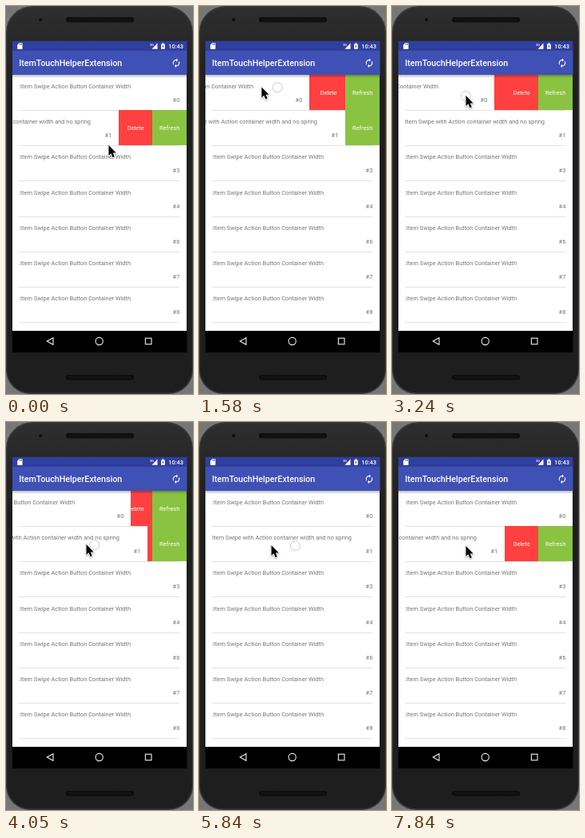
An HTML page with a canvas for the animation above (8000 ms loop, 234x485 px).

```html
<!DOCTYPE html>
<html lang="en">
<head>
<meta charset="utf-8">
<title>Swipe list</title>
<style>
html, body { margin: 0; width: 100%; height: 100%; overflow: hidden; background: #777; }
canvas { display: block; width: 234px; height: 485px; }
</style>
</head>
<body>
<canvas id="stage"></canvas>
<script>
const W = 234, H = 485, LOOP = 8000;
const LEFT = 8, RIGHT = 226, TOP = 43.5, BOTTOM = 433;
const LIST_TOP = 86, LIST_END = 406, ROW = 44.2;
const OPEN = 85, SPLIT = 183;
const SLOP = 10, LAG = 42, SETTLE = 200, CLOSE_TRAVEL = 140;
const BODY = '400 7.42px Roboto, sans-serif';
const BOLD = '500 7.42px Roboto, sans-serif';
const NUMBERS = [0, 1, 3, 4, 6, 7, 8];
const SPRING = ':Item Swipe Action Button Container Width';
const NO_SPRING = 'Item Swipe with Action container width and no spring';

// Pointer moves; those with a row also drag it until the release time.
const moves = [];
let last = { x: 128, y: 174 };
function move(start, end, x, y, row, release = end) {
  moves.push({ start, end, x, y, row, release, from: last });
  last = { x, y };
}
move(60, 590, 189, 181);
move(830, 1230, 196, 99);
move(1380, 1920, 1, 103, 0, 2150);
move(2150, 2900, 115, 109);
move(2940, 3240, 92, 112, 0, 3350);
move(3350, 3760, 170, 153);
move(3840, 4300, 71, 153, 1);
move(4650, 4750, 87, 154);
move(4880, 5150, 128, 154, 1);
move(5790, 5970, 50, 154, 1);
move(6270, 6700, 202, 155, 1);
move(7010, 7240, 134, 156, 1);
move(7640, 7820, 92, 155);
const drags = moves.filter(m => m.row !== undefined);

const AUTORENEW = new Path2D('M12 6v3l4-4-4-4v3c-4.42 0-8 3.58-8 8 0 1.57.46 3.03 1.24 4.26L6.7 14.8c-.45-.83-.7-1.79-.7-2.8 0-3.31 2.69-6 6-6zm6.76 1.74L17.3 9.2c.44.84.7 1.79.7 2.8 0 3.31-2.69 6-6 6v-3l-4 4 4 4v-3c4.42 0 8-3.58 8-8 0-1.57-.46-3.03-1.24-4.26z');
const SD_CARD = new Path2D('M18 2h-8L4 8v12c0 1.1.9 2 2 2h12c1.1 0 2-.9 2-2V4c0-1.1-.9-2-2-2zm-6 6h-2V4h2v4zm3 0h-2V4h2v4zm3 0h-2V4h2v4z');
const ARROW = new Path2D('M0 0V13L2.9 10.3 5 15.2 7.3 14.2 5.3 9.4H9.2Z');

const canvas = document.getElementById('stage');
const ctx = canvas.getContext('2d');
const dpr = window.devicePixelRatio || 1;
canvas.width = W * dpr;
canvas.height = H * dpr;

const clamp = (v, lo, hi) => Math.min(hi, Math.max(lo, v));
const mix = (a, b, p) => a + (b - a) * p;
const easeOut = p => 1 - (1 - clamp(p, 0, 1)) ** 2;

function pointerAt(t) {
  const m = moves.findLast(m => t >= m.start);
  if (!m) return moves[0].from;
  const p = easeOut((t - m.start) / (m.end - m.start));
  return { x: mix(m.from.x, m.x, p), y: mix(m.from.y, m.y, p) };
}

// Plays all drags up to t: the held row follows the touch, the other one closes.
function shiftsAt(t) {
  let shifts = [0, -OPEN];
  for (const d of drags) {
    if (t < d.start) break;
    const travel = pointerAt(Math.min(t, d.release) - LAG).x - d.from.x;
    const pull = Math.sign(travel) * Math.max(0, Math.abs(travel) - SLOP);
    const closing = Math.min(1, (travel / CLOSE_TRAVEL) ** 2);
    const settled = easeOut((t - d.release) / SETTLE);
    shifts = shifts.map((s, i) => {
      const held = i === d.row;
      const limit = i === 1 ? -OPEN : -Infinity;
      const live = held ? clamp(s + pull, limit, 0) : s * (1 - closing);
      return mix(live, held && d.x < d.from.x ? -OPEN : 0, settled);
    });
  }
  return shifts.map(Math.round);
}

function box(x, y, w, h, color) {
  ctx.fillStyle = color;
  ctx.fillRect(x, y, w, h);
}

function pill(x, y, w, h, r, fill) {
  ctx.beginPath();
  ctx.roundRect(x, y, w, h, r);
  ctx.fillStyle = fill;
  ctx.fill();
}

function ring(x, y, r, color, width) {
  ctx.beginPath();
  ctx.arc(x, y, r, 0, 7);
  ctx.strokeStyle = color;
  ctx.lineWidth = width;
  ctx.stroke();
}

function triangle(x1, y1, x2, y2, x3, y3) {
  ctx.beginPath();
  ctx.moveTo(x1, y1);
  ctx.lineTo(x2, y2);
  ctx.lineTo(x3, y3);
  ctx.closePath();
}

function label(str, x, y, color, align = 'left', font = BODY) {
  ctx.font = font;
  ctx.fillStyle = color;
  ctx.textAlign = align;
  ctx.fillText(str, x, y);
}

function icon(path, x, y, scale) {
  ctx.save();
  ctx.translate(x, y);
  ctx.scale(scale, scale);
  ctx.fillStyle = '#fff';
  ctx.fill(path);
  ctx.restore();
}

function clipped(x, y, w, h, paint) {
  ctx.save();
  ctx.beginPath();
  ctx.rect(x, y, w, h);
  ctx.clip();
  paint();
  ctx.restore();
}

function fade(y0, y1, from, to) {
  const g = ctx.createLinearGradient(0, y0, 0, y1);
  g.addColorStop(0, from);
  g.addColorStop(1, to);
  return g;
}

function grille(y) {
  pill(75, y, 85, 6.5, 3.2, '#0d0d0d');
  for (let row = 0; row < 2; row++) {
    for (let x = 79; x < 157; x += 3) box(x + row * 1.5, y + 1.7 + row * 2, 1, 1, '#2c2c2c');
  }
}

function drawPhone() {
  box(0, 0, W, H, '#777');
  pill(0, 0, W, H, [33, 33, 30, 30], '#3c3c3c');
  pill(1.2, 1.5, W - 2.4, H - 3, [32, 32, 29, 29], fade(0, 110, '#2e2e2e', '#1e1e1e'));
  grille(14);
  grille(461);
  pill(40, 14, 6.5, 6.5, 3.2, '#0d0d0d');
  ring(43.2, 17.2, 2.8, '#3b3b3b', 1);
}

function drawStatus() {
  box(LEFT, TOP, 219, 56 - TOP, '#303f9f');
  icon(SD_CARD, 12.6, 45.2, 0.4);
  label('3G', 180, 49.6, '#fff', 'left', '500 4px Roboto, sans-serif');
  triangle(182.5, 53.7, 189.5, 53.7, 189.5, 46.5);
  ctx.fillStyle = '#fff';
  ctx.fill();
  pill(194, 47.4, 4.8, 6.4, 0.6, '#fff');
  box(195.4, 46.2, 2, 1.4, '#fff');
  box(195.8, 49.2, 1.2, 2.6, '#303f9f');
  label('10:43', 222, 52.9, '#fff', 'right', BOLD);
}

function drawToolbar() {
  box(LEFT, LIST_TOP, 219, 4, fade(LIST_TOP, LIST_TOP + 4, 'rgba(0,0,0,.28)', 'rgba(0,0,0,0)'));
  box(LEFT, 56, 219, 30, '#3f51b5');
  label('ItemTouchHelperExtension', 16.2, 75.4, '#fff', 'left', '500 10.7px Roboto, sans-serif');
  icon(AUTORENEW, 206.6, 64.9, 0.53);
}

function drawNav() {
  box(LEFT, LIST_END, 219, 27, '#000');
  ctx.strokeStyle = '#eee';
  ctx.lineWidth = 1.1;
  triangle(51.3, 419, 59, 414.8, 59, 423.2);
  ctx.stroke();
  ring(116.7, 419, 4.6, '#eee', 1.1);
  ctx.strokeRect(174.4, 415.2, 7.6, 7.6);
}

function drawActions(y, edge) {
  box(edge, y, SPLIT - edge, ROW, '#ff4040');
  box(SPLIT, y, RIGHT - SPLIT, ROW, '#8ac341');
  label('Delete', 162.2, y + 24.6, '#fff', 'center');
  label('Refresh', 204.6, y + 24.6, '#fff', 'center');
}

function drawRow(i, shift) {
  const y = Math.round(LIST_TOP + i * ROW);
  const edge = RIGHT + shift;
  box(16, y + 44, 201, 1, '#e3e3e3');
  label(i === 1 ? NO_SPRING : SPRING, 16.3 + shift, y + 16.7, '#757575');
  label('#' + NUMBERS[i], 217.3 + shift, y + 33.5, '#757575', 'right');
  if (shift < 0) clipped(edge, y, -shift, ROW, () => drawActions(y, edge));
}

function drawScreen(t) {
  box(LEFT, LIST_TOP, RIGHT - LEFT, LIST_END - LIST_TOP, '#fff');
  const shifts = shiftsAt(t);
  NUMBERS.forEach((_, i) => drawRow(i, shifts[i] || 0));
  drawToolbar();
  drawStatus();
  drawNav();
}

function drawPointer(t) {
  if (drags.some(d => t >= d.start - 100 && t < d.release)) {
    const touch = pointerAt(t - LAG);
    ring(touch.x, touch.y + 0.7, 6, 'rgba(185,180,225,.75)', 1);
  }
  const { x, y } = pointerAt(t);
  ctx.save();
  ctx.translate(x + 0.5, y);
  ctx.shadowColor = 'rgba(0,0,0,.35)';
  ctx.shadowBlur = 2 * dpr;
  ctx.shadowOffsetY = dpr;
  ctx.lineWidth = 1.6;
  ctx.strokeStyle = '#fff';
  ctx.stroke(ARROW);
  ctx.shadowColor = 'transparent';
  ctx.fillStyle = '#000';
  ctx.fill(ARROW);
  ctx.restore();
}

function draw(now) {
  const t = now % LOOP;
  ctx.setTransform(dpr, 0, 0, dpr, 0, 0);
  drawPhone();
  clipped(LEFT, TOP, 218.5, BOTTOM - TOP, () => drawScreen(t));
  drawPointer(t);
  requestAnimationFrame(draw);
}
draw(0);
</script>
</body>
</html>
```
